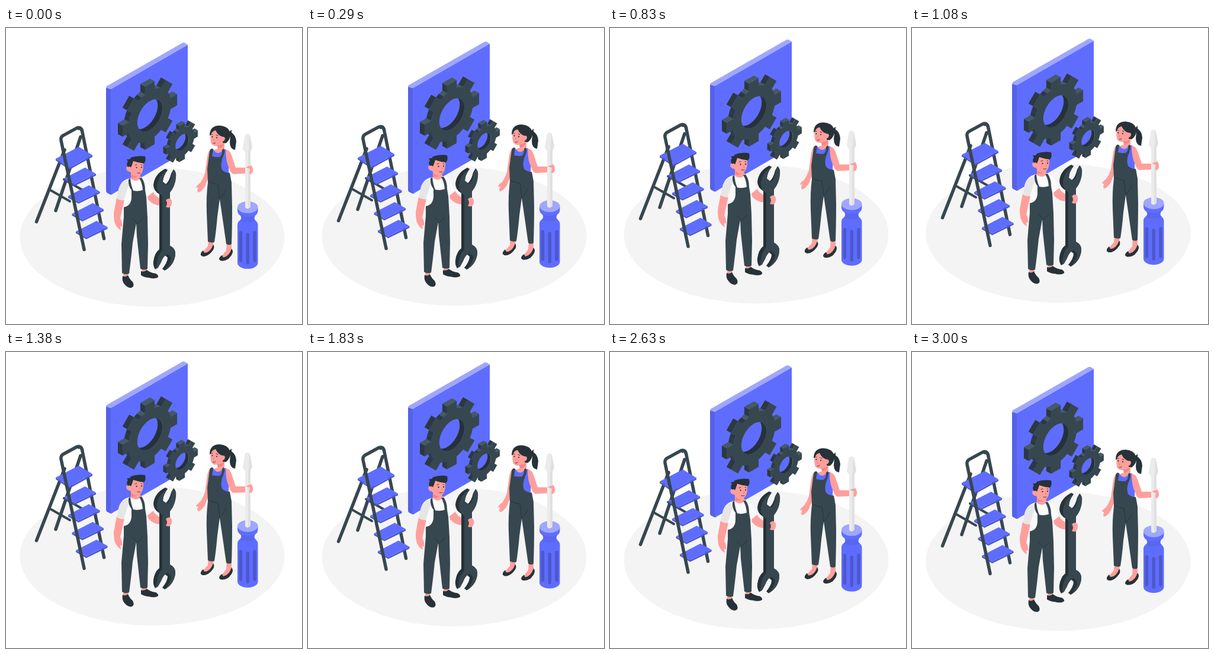
An HTML page that plays this animation: 500 px wide and 500 px high, repeating every 3040 ms.

```html
<!DOCTYPE html>
<html lang="en">
<head>
<meta charset="utf-8">
<title>Workshop</title>
<style>
  html, body { margin: 0; width: 100%; height: 100%; overflow: hidden; background: #fff; }
  svg { display: block; width: 100%; height: 100%; }
  .blue { fill: #5f6dff; }
  .shade { fill: #5562e6; }
  .pale { fill: #9fa7ff; }
  .dark { fill: #37474f; }
  .black { fill: #263238; }
  .skin { fill: #ff9f9c; }
  .blush { fill: #f58583; }
  .line { fill: none; stroke: #37474f; stroke-linecap: round; stroke-linejoin: round; }
  .thin { fill: none; stroke: #263238; stroke-width: .9; stroke-linecap: round; }
</style>
</head>
<body>
<svg viewBox="0 0 500 500">
<g id="scene">
  <ellipse cx="247" cy="353.5" rx="223.5" ry="117.5" fill="#f4f4f4"/>

  <!-- panel -->
  <path class="shade" d="M169 101L177 103.500V282L171 279Q169 278 169 275Z"/>
  <path class="blue" d="M177 103.500L307 28.500V204Q307 207 304 209L181 280Q179 282 177 282Z"/>
  <path class="pale" d="M169 101Q169 99 171 98L297 26Q300 24 303 26L306 28L307 28.500L177 103.500Z"/>
  <g id="gears"></g>

  <!-- ladder -->
  <g class="line" stroke-width="5.500">
    <path d="M126 184L84 308.500"/>
    <path d="M73 273L108 293M98 256L138 279" stroke-width="4"/>
    <path d="M123 170Q127 168 128.500 174L165.500 356"/>
    <path d="M99 206L51.500 327.500"/>
  </g>
  <g id="steps"></g>
  <path class="line" stroke-width="5.500" d="M132 374.500L93 190Q92 185 96 182L119 169.500Q126 166 128.500 174"/>

  <!-- woman -->
  <g>
    <path class="skin" d="M348 204Q342 206 340 217L336 246Q333 255 328 262Q322 266 321 270L325 270Q322 274 324 278Q328 278 332 273Q337 268 338 262L345 247L350 222Z"/>
    <path class="skin" d="M342 356H351L350 371L345 379L335 383L333 378L341 369Z"/>
    <path class="skin" d="M373 362H381L381 376L376 386L364 390L364 386L372 376Z"/>
    <path class="black" d="M329 384Q328 380 333 376L335 380Q345 380 350 366Q353 370 350 375L346 380Q339 387 332 386Z"/>
    <path class="black" d="M360 391Q360 387 365 384L367 388Q377 386 381 373Q385 377 381 384L376 390Q368 395 362 393Z"/>
    <path class="skin" d="M357 193L369 190L369 205Q373 207 376 212L377 222L349 215L352 206L358 204Z"/>
    <path class="blue" d="M349 204L354 210Q361 214 366 206L372 205Q372 215 377 222L376 246L362 248L346 234V210Z"/>
    <path class="dark" d="M344 208Q345 204 348 204L350 205L348 217Q355 219 361 218Q366 214 365 206L368 204Q371 207 367 217Q361 231 365 240Q370 245 378 245L381 261L382 303Q382 336 381 365Q377 368 372 365L366 323L361 289L357 319Q355 343 352 362Q347 364 341 361L339 312Q338 286 341 261L340 238Z"/>
    <path class="thin" d="M342 259Q350 264 357 264M358 264Q360 275 361 289M362 287Q368 282 371 273"/>
    <path class="skin" d="M371 206Q378 206 381 215L388 236L405 236Q409 231 414 232L416 235Q419 242 414 247Q409 249 404 246L384 247Q379 245 377 237Q371 226 371 206Z"/>
    <path class="skin" d="M346 176Q344 189 347 196Q351 201 360 199Q370 197 372 184L367 171L351 170Z"/>
    <path class="black" d="M344 182Q344 165 361 165Q374 166 378 175L381 172L381 177Q388 181 389 192L387 206Q378 205 378 193L379 183Q377 191 371 195L366 194L366 184Q358 182 354 173Q348 174 346 181Z"/>
    <path class="skin" d="M364 185Q369 182 370 187Q369 193 364 192Z"/>
    <g class="black"><circle cx="348.500" cy="184" r="1.100"/><circle cx="356" cy="185.500" r="1.100"/></g>
    <path class="thin" d="M347 180L349 180M355 181L358 182M350 195Q352 196 354 194"/>
    <path class="blush" d="M351 186L349.500 191L351.500 191ZM357 199Q365 198 368 195Q367 203 358 204Z"/>
  </g>

  <!-- screwdriver -->
  <path class="blue" d="M391 304V309Q391 314 397 318Q399 324 393 327Q391 329 391 333V397A17.200 10 0 0 0 425.500 397V333Q425.500 329 422 326Q417 323 421 317Q425.500 314 425.500 309V304Z"/>
  <path class="shade" opacity=".6" d="M396 317Q408 322 421 317Q418 322 422 326Q408 332 394 326Q399 323 396 317Z"/>
  <path d="M396.500 346V393M408.300 349V397M420 346V393" stroke="#4c57cc" stroke-width="5.500" stroke-linecap="round"/>
  <ellipse class="pale" cx="408.300" cy="303" rx="17.300" ry="10"/>
  <path fill="#e0e0e0" d="M404 181Q408 177 412 181L416 202L413 210V303Q408 308 404 303V210L400 204Z"/>
  <path fill="#ebebeb" d="M404 181Q408 177 411 180L410 203L409 210V305Q406 306 404 303V210L400 204Z"/>
  <path class="skin" d="M405 236Q412 231 415 235Q419 241 415 246L411 247L412 238Z"/>

  <!-- man -->
  <g>
    <path class="skin" d="M187 286L182 313Q182 325 184 330Q187 338 194 342L193 335L196 336Q197 328 193 322L200 290Z"/>
    <path class="skin" d="M238 281L248 276Q251 284 262 289L262 300Q248 300 240 290Z"/>
    <path class="skin" d="M198 411H207L206 422H198ZM229 404H238V415H229Z"/>
    <path class="black" d="M197 419Q201 422 206 418Q209 425 214 429Q218 437 212 439Q206 440 201 434Q195 428 197 419Z"/>
    <path class="black" d="M228 411Q233 413 238 409Q244 414 253 415Q258 418 257 421Q252 425 241 422Q235 422 228 418Z"/>
    <path fill="#fafafa" d="M210 254L228 252Q239 255 242 264L249 277L238 286L236 302H200L200 291Q193 292 187 288L191 270Q196 256 210 254Z"/>
    <path fill="#e6e6e6" d="M208 256Q197 259 191 270L187 288Q193 292 199 291L207 266Z"/>
    <path class="skin" d="M211 244L226 243L227 254Q220 262 211 255Z"/>
    <path class="dark" d="M207 256L210 254Q211 266 215 275Q223 277 231 274Q230 261 225 254L229 253Q235 261 235 274L237 286L239 320L240 365L239 407Q234 410 227 407L221 352L220 330L214 363Q211 393 208 415Q202 418 196 414L195 365L199 319V303Q211 301 212 287V274Q206 267 207 256Z"/>
    <path class="thin" d="M220 331Q228 327 231 321M214 322L220 328"/>
    <path class="skin" d="M208 228Q204 241 213 246Q218 252 224 250Q232 247 232 231L230 223H213Z"/>
    <path class="skin" d="M211 235Q205 231 203 237Q204 244 211 243Z"/>
    <path class="black" d="M205 234Q203 228 206 226L204 222Q210 223 211 219Q222 215 235 217Q237 225 233 229Q223 228 215 225Q213 232 211 236Q209 233 207 235Z"/>
    <g class="black"><circle cx="220.500" cy="236" r="1.150"/><circle cx="229" cy="235.500" r="1.150"/></g>
    <path class="thin" d="M218 232L221 231M228 231L230 232M222 245Q225 246 227 245"/>
    <path class="blush" d="M226 236L228 241L225 241ZM212 247Q216 252 222 251Q217 255 212 253Z"/>
  </g>

  <!-- wrench -->
  <path class="black" d="M259 281Q249 275 249 265Q251 247 269 238L273 240Q265 251 265 260L270 264Q276 259 279 246L283 239Q288 243 287 252Q286 267 277 278V368Q287 373 286 383Q284 401 268 410L264 407Q273 396 273 388L268 384Q260 391 257 404L252 408Q248 402 249 394Q251 380 259 374Z"/>
  <path class="dark" d="M264 284Q254 278 255 266Q258 248 273 240Q265 251 265 260L270 264L272 265Q279 261 280 246L284 240Q288 245 287 252Q286 267 277 278V368Q287 373 286 383Q284 401 268 410Q278 399 279 388L273 382Q266 385 262 396L257 405L254 407Q254 386 264 376Z"/>
  <path class="skin" d="M270 291Q275 286 279 290Q282 296 278 302Q274 305 270 302Q274 297 270 291Z"/>
</g>
</svg>
<script>
const $ = id => document.getElementById(id);
const poly = (points, fill) => `<polygon points="${points.join(' ')}" fill="${fill}"/>`;

// Gear standing on the panel plane, extruded back by depth
function gear(cx, cy, tip, hole, depth) {
  const root = tip * .77, back = [-depth, -depth * .56], pts = [];
  const at = (r, deg) => {
    const a = deg * Math.PI / 180, u = r * Math.cos(a);
    return [cx + u * .866, cy + r * Math.sin(a) - u / 2];
  };
  const shift = ([x, y]) => [x + back[0], y + back[1]];
  for (let a = 0; a < 360; a += 45)
    pts.push(at(root, a - 13), at(tip, a - 10), at(tip, a + 10), at(root, a + 13), at(root, a + 22.5));
  const ring = Array.from({ length: 48 }, (_, i) => at(hole, i * 7.5));

  let out = '';
  pts.forEach((p, i) => {
    const q = pts[(i + 1) % pts.length], dx = q[0] - p[0], dy = q[1] - p[1];
    if (dy * back[0] - dx * back[1] > 0)
      out += poly([p, q, shift(q), shift(p)], dx > -dy ? '#455a64' : '#2c3940');
  });
  out += poly(ring, '#263238') + poly(ring.map(shift), '#5f6dff');
  const loop = p => 'M' + p.join('L') + 'Z';
  return out + `<path class="dark" fill-rule="evenodd" d="${loop(pts)}${loop(ring)}"/>`;
}
$('gears').innerHTML = gear(243, 148, 54, 24.5, 8) + gear(297.5, 193.5, 31, 13, 5.5);

// Tread given by its left, back, right and front corners
function step(l, b, r, f) {
  const drop = ([x, y]) => [x, y + 3];
  return poly([l, f, r, drop(r), drop(f), drop(l)], '#4c57cc') + poly([l, b, r, f], '#5f6dff');
}
let steps = step([84, 221], [123, 201], [146, 215], [107, 236.5]);
for (let i = 0; i < 4; i++) {
  const x = i * 6.5, y = i * 30;
  steps += step([98.5 + x, 254 + y], [133.5 + x, 236 + y], [152 + x, 246.5 + y], [116 + x, 264 + y]);
}
$('steps').innerHTML = steps;

const LOOP = 3040, RISE = 9.7, LEAD = 30;
const start = performance.now();
function draw() {
  const p = (performance.now() - start + LEAD) % LOOP / LOOP;
  const y = -RISE * (1 - Math.abs(2 * p - 1));
  $('scene').setAttribute('transform', `translate(0 ${y.toFixed(3)})`);
  requestAnimationFrame(draw);
}
draw();
</script>
</body>
</html>
```
